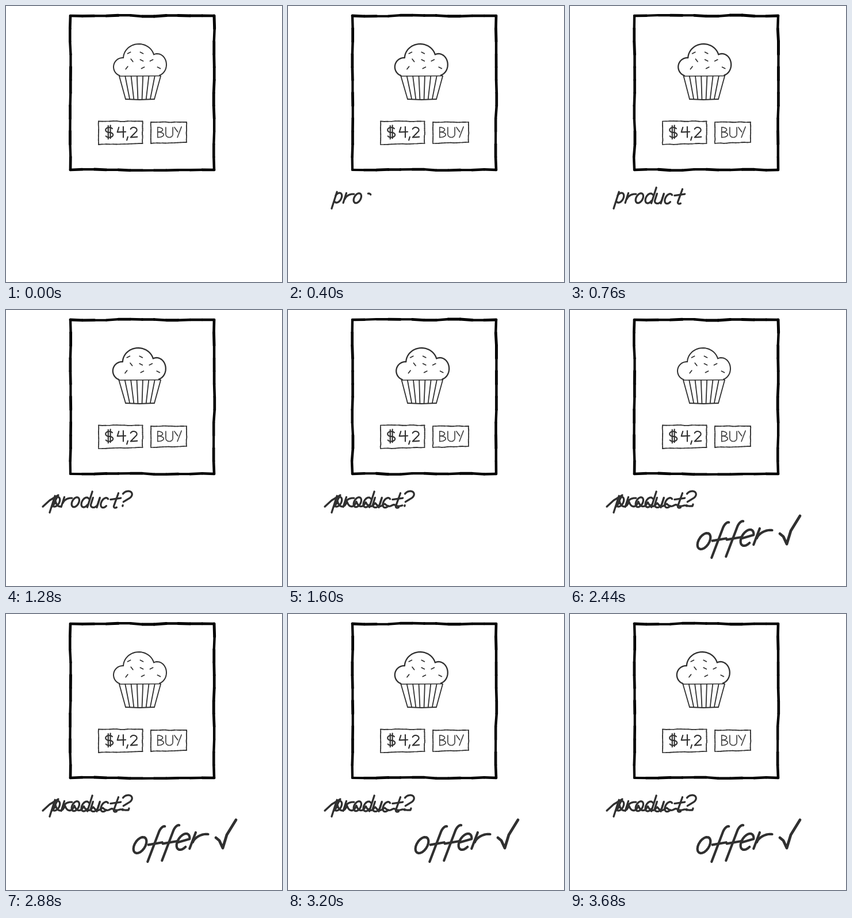
Animation of 480x480 px, one loop 3.84 s. Source, as an HTML page with a canvas:

```html
<!DOCTYPE html>
<html lang="en">
<head>
<meta charset="utf-8">
<title>Product or offer</title>
<style>
  html, body { margin: 0; width: 100%; height: 100%; overflow: hidden; background: #fff; }
  canvas { display: block; width: 100vmin; height: 100vmin; }
</style>
</head>
<body>
<canvas id="stage" width="480" height="480"></canvas>
<script>
const ctx = document.getElementById('stage').getContext('2d');
const LOOP = 3840, STEP = 40, POSE = 160, POSES = 3;
const INK = '#303030';

const range = n => Array.from({ length: n }, (_, i) => i);
const mix = (a, b, u) => a + (b - a) * u;
const distance = (p, q) => Math.hypot(q[0] - p[0], q[1] - p[1]);
const lengthOf = points =>
  points.slice(1).reduce((sum, p, i) => sum + distance(points[i], p), 0);

// Seeded value between -1 and 1.
function noise(seed) {
  const v = Math.sin(seed * 127.1 + 11.7) * 43758.5453;
  return (v - Math.floor(v)) * 2 - 1;
}

// Angles in degrees, counter-clockwise when y points up.
function arc(cx, cy, rx, ry, from, to) {
  return range(21).map(i => {
    const a = mix(from, to, i / 20) * Math.PI / 180;
    return [cx + rx * Math.cos(a), cy + ry * Math.sin(a)];
  });
}

function trace(points, width, color = INK, limit = Infinity) {
  ctx.strokeStyle = color;
  ctx.lineWidth = width;
  ctx.beginPath();
  ctx.moveTo(...points[0]);
  for (let i = 1; i < points.length && limit > 0; i++) {
    const p = points[i - 1], q = points[i];
    const d = distance(p, q), u = d ? Math.min(1, limit / d) : 1;
    ctx.lineTo(mix(p[0], q[0], u), mix(p[1], q[1], u));
    limit -= d;
  }
  ctx.stroke();
}

// Letters live in a box with the baseline at 0 and the height of an "o" at 1.
const stem = (x, top, bottom) => [[x, top], [x, bottom]];
const bowl = (from, to) => arc(0, 0.5, 0.36, 0.5, from, to);
const cup = () => [[-0.35, 1], ...arc(0, 0.33, 0.35, 0.33, 180, 360), [0.35, 1]];
const hook = end => arc(0, 0.73, 0.32, 0.27, 160, end);

const glyphs = {
  p: [stem(-0.3, 1.1, -0.6), bowl(150, -130)],
  r: [stem(-0.3, 1, 0), arc(0.4, 0.4, 0.65, 0.5, 180, 80)],
  o: [bowl(60, 430)],
  d: [bowl(50, 330), stem(0.38, 1.6, 0)],
  u: [cup(), stem(0.36, 0.9, 0)],
  c: [bowl(50, 320)],
  t: [[[0.1, 1.5], ...arc(0.25, 0.2, 0.2, 0.2, 180, 310)], [[-0.5, 0.85], [0.5, 1]]],
  f: [[...arc(0.2, 1.25, 0.2, 0.35, 80, 180), [0, -0.6]], [[-0.35, 0.45], [0.45, 0.6]]],
  e: [[[-0.35, 0.45], ...bowl(20, 320)]],
  '?': [[...hook(-50), [-0.12, 0.28]], stem(-0.1, 0.05, 0)],
  $: [[...arc(0, 0.74, 0.36, 0.25, 30, 260), ...arc(0, 0.25, 0.38, 0.25, 80, -150)],
    stem(-0.1, 1.15, -0.15), stem(0.12, 1.2, -0.1)],
  4: [[[-0.3, 1], [-0.45, 0.52], [0.38, 0.56]], stem(0.14, 1.05, 0)],
  ',': [[[0.05, 0.05], [-0.05, -0.28]]],
  2: [[...hook(-30), [-0.3, 0], [0.36, 0.05]]],
  B: [stem(-0.3, 1, 0), arc(-0.3, 0.76, 0.5, 0.24, 90, -90), arc(-0.3, 0.27, 0.6, 0.27, 90, -90)],
  U: [cup()],
  Y: [[[-0.35, 1], [-0.02, 0.55]], [[0.35, 1.05], [-0.05, 0]]]
};

// Places evenly spaced letters; x is the middle of the first one.
function letter(text, { x, y, size, advance = 0, slant = 0, rise = 0 }) {
  return [...text].flatMap((char, i) => glyphs[char].map(stroke =>
    stroke.map(([gx, gy]) => [
      x + i * advance + (gx + slant * (gy - 0.5)) * size,
      y - i * advance * rise - gy * size
    ])));
}

// A hump over the first letter, then a scribble that calms into a line.
function strikeOut() {
  const lead = [[64, 342], [76, 331], [91, 322], [86, 331], [80, 342]];
  const scribble = range(121).map(i => {
    const u = i / 120, turn = u * Math.PI * 16, size = 6 * (1 - u);
    return [82 + 131 * u + size * 0.5 * Math.cos(turn), 336 + 5 * u - size * Math.sin(turn)];
  });
  return [[...lead, ...scribble, [214, 338]]];
}

const writing = (start, end, width, strokes) => ({ start, end, width, strokes });

const writings = [
  writing(160, 760, 3.3,
    letter('product', { x: 87, y: 342, size: 17, advance: 16.9, slant: 0.32, rise: -0.02 })),
  writing(800, 840, 3.3, letter('?', { x: 209, y: 341, size: 26, slant: 0.28 })),
  writing(1120, 1640, 3.3, strikeOut()),
  writing(1800, 2280, 4.2,
    letter('offer', { x: 233, y: 416, size: 28, advance: 25, slant: 0.38, rise: 0.08 })),
  writing(2320, 2440, 4.8, [[[365, 389], [371, 394], [377, 407], [384, 384], [400, 358]]])
];

function drawWriting({ start, end, width, strokes }, time) {
  if (time < start) return;
  const done = Math.min(1, (Math.floor((time - start) / STEP) + 1) / ((end - start) / STEP + 1));
  let left = done * strokes.reduce((sum, s) => sum + lengthOf(s), 0) + 0.01;
  for (const stroke of strokes) {
    if (left > 0) trace(stroke, width, INK, left);
    left -= lengthOf(stroke);
  }
}

// A hand-ruled rectangle whose sides waver and whose lower left corner sags.
function sketchBox(x, y, w, h, { width, waver, seed, sag = 0, color = INK }) {
  const corners = [[x, y], [x + w, y], [x + w, y + h], [x, y + h + sag]];
  corners.forEach((from, side) => {
    const to = corners[(side + 1) % 4], parts = 12;
    const points = range(parts + 1).map(i => {
      const bend = i % parts ? waver * noise(seed + side * 50 + (i >> 1)) : 0;
      return [mix(from[0], to[0], i / parts) + (side % 2) * bend,
        mix(from[1], to[1], i / parts) + (1 - side % 2) * bend];
    });
    points.slice(1).forEach((p, i) =>
      trace([points[i], p], width * (1 + 0.1 * noise(seed + i + side * 7)), color));
  });
}

function drawMuffin(pose) {
  const sway = 1.4 * Math.sin(pose * 2 * Math.PI / POSES);
  const weight = pose ? 2.3 : 2;
  ctx.save();
  ctx.translate(sway, 0);
  trace([
    ...arc(203, 106, 16, -16, 250, 90),
    ...arc(231, 91, 27, -25, 178, 15),
    ...arc(263, 102, 16, -19, 110, -75)
  ], weight);
  let index = 0;
  [[214, 22, 2], [219, 17, 3], [210, 28, 3]].forEach(([first, gap, count], row) => {
    for (const i of range(count)) {
      const tilt = 0.9 * Math.sin((index++ - 0.5) * Math.PI / 3);
      const x = first + i * gap, y = 81.5 + row * 13;
      const dx = 2.8 * Math.cos(tilt), dy = 2.8 * Math.sin(tilt);
      trace([[x - dx, y - dy], [x + dx, y + dy]], 1.8);
    }
  });
  ctx.restore();

  const left = 197 + sway / 2, right = 269;
  trace([[left, 122], [right, 121.5]], 1.7);
  trace([[208, 162], [232, 163], [258, 162]], 1.8);
  for (const i of range(8)) {
    const u = i / 7;
    trace([[mix(left, right, u), 122], [mix(208, 258, u), 162]], 1.8);
  }
}

function drawCard(pose) {
  const seed = pose * 300 + 1;
  sketchBox(112, 17, 250, 268, { width: 4.5, waver: 1, seed, color: '#000' });
  drawMuffin(pose);
  const button = { width: 1.7, waver: 0.4, seed, sag: 2 };
  sketchBox(161, 200.5, 76.5, 38.5, button);
  sketchBox(252, 202, 62, 35, button);
  const label = { y: 228.5, size: 17.5 };
  const price = [
    ...letter('$4', { ...label, x: 179.5, advance: 22 }),
    ...letter(',2', { ...label, x: 211, advance: 11 })
  ];
  price.forEach(stroke => trace(stroke, 2.1));
  letter('BUY', { ...label, x: 269, advance: 15 }).forEach(stroke => trace(stroke, 1.7, '#444'));
}

function render(time) {
  ctx.fillStyle = '#fff';
  ctx.fillRect(0, 0, 480, 480);
  ctx.lineCap = ctx.lineJoin = 'round';
  drawCard(Math.floor(time / POSE) % POSES);
  writings.forEach(item => drawWriting(item, time));
}

const begin = performance.now();
function tick() {
  render((performance.now() - begin) % LOOP);
  requestAnimationFrame(tick);
}
tick();
</script>
</body>
</html>
```
